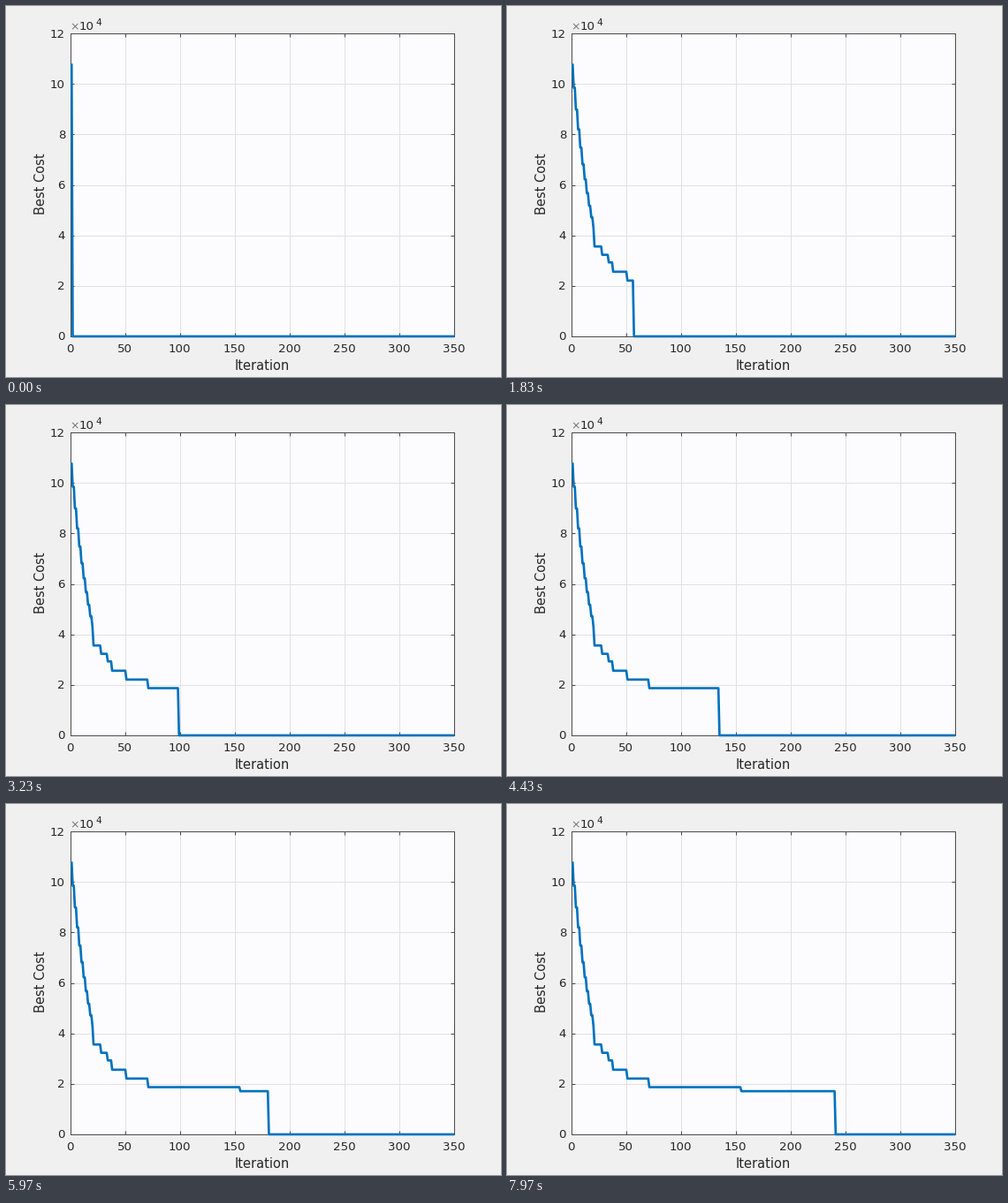
Recreate the animation shown at these times as a matplotlib script. Size 560x420 px, loop 8000 ms.

```python
import numpy as np
import matplotlib.pyplot as plt
from matplotlib.animation import FuncAnimation

W, H, DPI = 560, 420, 100
FRAMES, LOOP_MS = 400, 8000
LEFT, RIGHT, TOP, BOTTOM = 73, 507, 31, 374
X_MAX, Y_MAX = 350, 12
PX = 72 / DPI

BACK, PLOT = "#f0f0f0", "#fcfcfe"
INK, AXIS, GRID, BLUE = "#262626", "#4c4c4c", "#e0e0e6", "#0072bd"

# Late plateaus of the best cost (x 10^4): first iteration and level.
PLATEAUS = [(21, 3.56), (28, 3.23), (34, 2.93), (38, 2.56),
            (51, 2.21), (71, 1.87), (155, 1.71)]


def best_cost(iters):
    """Exponential fall in two-iteration steps, then long plateaus."""
    cost = 10.8 * np.exp(-0.046 * (iters // 2 * 2))
    for start, level in PLATEAUS:
        cost[iters >= start] = level
    return cost


def label(x, y, text, size=13.33, ha="center", color=INK, **kw):
    """Text with its baseline at stage pixel (x, y), y counted downwards."""
    fig.text(x / W, 1 - y / H, text, fontsize=size * PX, ha=ha,
             va="baseline", family="DejaVu Sans", color=color, **kw)


fig = plt.figure(figsize=(W / DPI, H / DPI), dpi=DPI, facecolor=BACK)
ax = fig.add_axes([LEFT / W, 1 - BOTTOM / H,
                   (RIGHT - LEFT) / W, (BOTTOM - TOP) / H], facecolor=PLOT)
ax.set(xlim=(0, X_MAX), ylim=(0, Y_MAX),
       xticks=range(0, X_MAX + 1, 50), yticks=range(0, Y_MAX + 1, 2))
ax.set_axisbelow(True)
ax.grid(color=GRID, lw=PX)
ax.tick_params(direction="in", length=4 * PX, width=PX, color=AXIS,
               top=True, right=True, labelbottom=False, labelleft=False)
for spine in ax.spines.values():
    spine.set(color=AXIS, linewidth=PX)

for x in ax.get_xticks():
    label(LEFT + x / X_MAX * (RIGHT - LEFT) - 0.5, 392, f"{x:.0f}")
for y in ax.get_yticks():
    label(67, BOTTOM - y / Y_MAX * (BOTTOM - TOP) + 4.5, f"{y:.0f}",
          ha="right")

label(72, 27, "×", size=12.5, ha="left", color="#777777")
label(83, 27, "10", ha="left")
label(101, 21.5, "4", size=10.5, ha="left")
label(290, 412, "Iteration", size=14.67)
label(44, 201, "Best Cost", size=14.67, rotation=90, rotation_mode="anchor")

iters = np.arange(1, X_MAX + 1)
cost = best_cost(iters)
curve, = ax.plot([], [], color=BLUE, lw=2.67 * PX, solid_joinstyle="round",
                 solid_capstyle="butt", clip_on=False, zorder=5)


def update(frame):
    # Thirty iterations a second; those not reached yet stay at zero.
    done = 1 + (3 * frame + 2) // 5
    curve.set_data(iters, np.where(iters <= done, cost, 0))
    return curve,


anim = FuncAnimation(fig, update, frames=FRAMES, interval=LOOP_MS / FRAMES,
                     init_func=lambda: update(0), repeat=True, repeat_delay=0,
                     blit=True)
plt.show()
```
